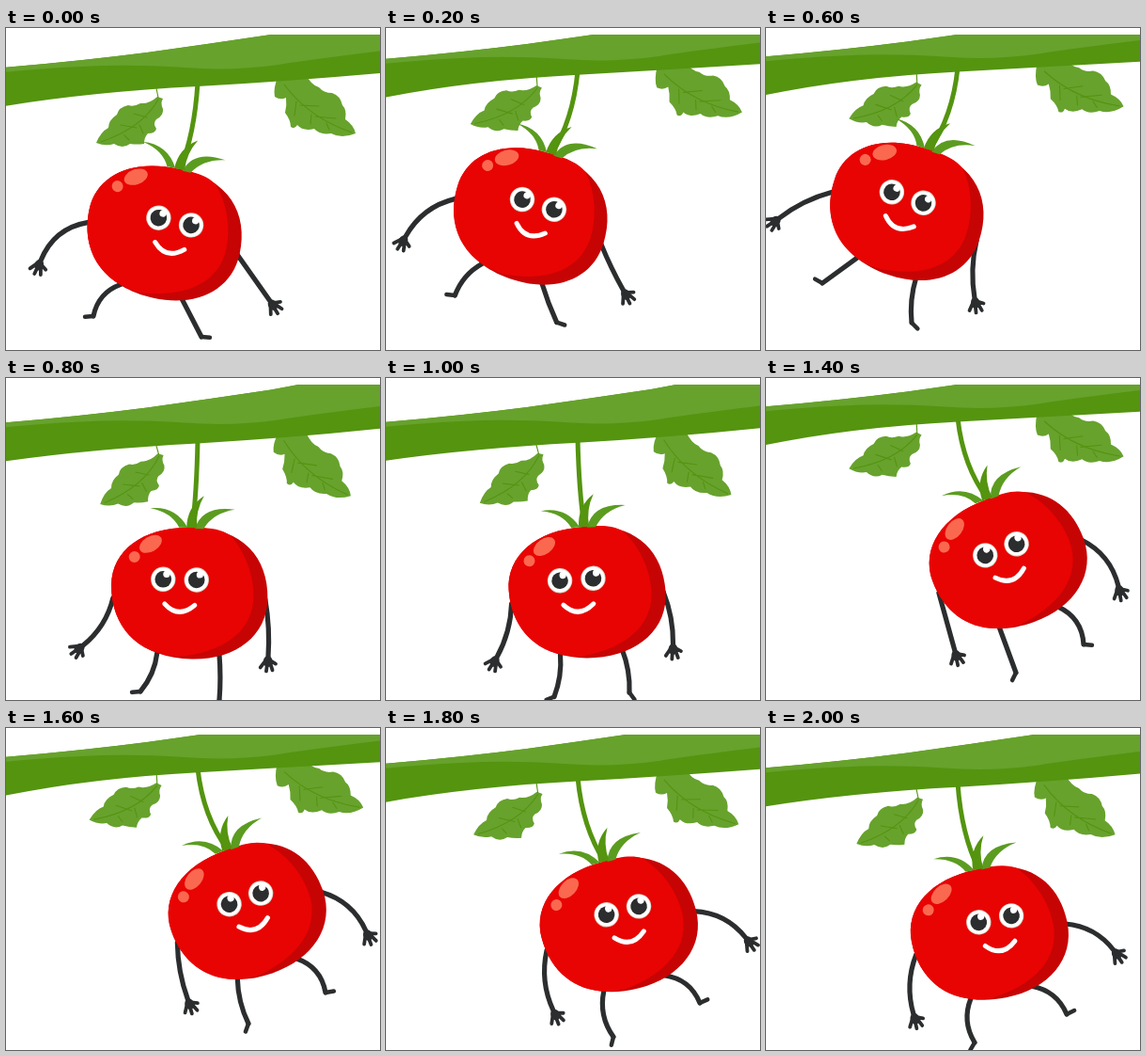
An HTML page with a canvas that plays this animation: 398 px wide and 342 px high, repeating every 2200 ms.

```html
<!DOCTYPE html>
<html lang="en">
<head>
<meta charset="utf-8">
<title>Swinging tomato</title>
<style>
  html, body { margin: 0; width: 100%; height: 100%; overflow: hidden; background: #fff; }
  canvas { display: block; }
</style>
</head>
<body>
<canvas id="stage" width="398" height="342"></canvas>
<script>
const ctx = document.getElementById('stage').getContext('2d');
const LOOP = 2200, STEP = 200;
const DARK_GREEN = '#54940f', GREEN = '#67a22d', INK = '#2b2d2e';

// Body centre and tilt in degrees, one row per step.
const SWING = [
  [168, 218, 12.5], [153, 200, 17.5], [146, 192, 20], [149, 195, 19],
  [195, 229, 1], [214, 228, -4], [235, 221, -10], [258, 195, -20],
  [257, 196, -19], [248, 210, -14.5], [238, 219, -11.3]
];

// Limb poses: end x, y (from the body centre) and bend; foot angles in degrees.
const POSES = [
  { t: 0,    face: -9,  armL: [-131, 29, .28],  armR: [113, 72, 0],    legL: [-75, 88, .28],   legR: [40, 110, 0],    footL: 175, footR: 5 },
  { t: 600,  face: -21, armL: [-135, 7, .1],    armR: [73, 92, .1],    legL: [-89, 76, 0],     legR: [6, 118, .1],    footL: 209, footR: 45 },
  { t: 800,  face: -28, armL: [-113, 55, -.17], armR: [84, 67, -.06],  legL: [-52, 104, -.15], legR: [32, 113, -.04], footL: 175, footR: 70 },
  { t: 1200, face: -28, armL: [-79, 82, -.07],  armR: [99, 43, -.14],  legL: [-18, 117, -.08], legR: [58, 99, -.17],  footL: 140, footR: 37 },
  { t: 1400, face: -21, armL: [-57, 95, 0],     armR: [117, 26, -.23], legL: [8, 118, 0],      legR: [80, 88, -.3],   footL: 116, footR: 5 },
  { t: 1800, face: -10, armL: [-70, 90, .17],   armR: [135, 13, -.23], legL: [-6, 118, .22],   legR: [86, 82, -.29],  footL: 104, footR: -24 },
  { t: 2000, face: -9,  armL: [-81, 85, .17],   armR: [132, 17, -.22], legL: [-16, 115, .25],  legR: [82, 85, -.27],  footL: 120, footR: -26 }
];

const LEAF_L = new Path2D('M161 73 Q152 81 143 80 Q136 84 130 82 Q120 84 118 92 Q109 98 109 106 Q101 110 96 122 Q106 126 115 123 Q124 129 132 123 Q139 124 147 123 Q147 116 151 112 Q159 112 160 107 Q156 101 160 97 Q168 93 167 86 Q164 80 167 75Z');
const VEINS_L = new Path2D('M160 64 L162 74 M162 76 Q145 106 101 121 M150 95 L136 91 M139 106 L122 103 M142 103 L146 112 M126 114 L131 119');
const LEAF_R = new Path2D('M290 50 Q284 64 286 73 Q292 77 298 74 Q299 82 297 90 Q303 98 303 105 Q307 108 310 103 Q316 110 328 107 Q334 114 346 112 Q357 118 372 112 Q370 103 361 97 Q363 87 358 82 Q356 72 347 69 Q338 69 333 63 Q325 61 318 48Z');
const VEINS_R = new Path2D('M296 60 Q322 95 368 111 M313 82 L333 83 M329 94 L351 96 M309 78 L307 93 M325 92 L324 102 M341 101 L344 108');
const BODY = new Path2D('M0 -70 C55 -72 83.5 -40 83.5 4 C83.5 44 50 69.5 4 69.5 C-48 69.5 -83 40 -83 -8 C-83 -45 -50 -70 0 -70Z');
const BODY_LIGHT = new Path2D('M0 -70 C20 -71 33 -69 42 -63 C59 -46 68.5 -20 68.5 2 C68.5 40 36 62 -10 67 C-54 66 -83 36 -83 -8 C-83 -45 -50 -70 0 -70Z');
const SEPALS = [
  ['M-43 -90 Q-16 -93 -3 -70 L-12 -70 Q-20 -86 -43 -90Z', '#5b9c20'],
  ['M5 -69 Q12 -94 47 -90 Q24 -86 14 -69Z', '#5b9c20'],
  ['M-4 -70 Q-4 -92 14 -104 Q5 -88 7 -70Z', DARK_GREEN]
].map(([d, color]) => [new Path2D(d), color]);

const mix = (a, b, k) => Array.isArray(a) ? a.map((v, i) => mix(v, b[i], k)) : a + (b - a) * k;
const rad = deg => deg * Math.PI / 180;

function turn(x, y, deg) {
  const c = Math.cos(rad(deg)), s = Math.sin(rad(deg));
  return [x * c - y * s, x * s + y * c];
}

function poseAt(t) {
  let i = 0;
  while (i < POSES.length - 2 && POSES[i + 1].t <= t) i++;
  const a = POSES[i], b = POSES[i + 1], k = (t - a.t) / (b.t - a.t), pose = {};
  for (const key in a) pose[key] = mix(a[key], b[key], k);
  return pose;
}

function fill(path, color) {
  ctx.fillStyle = color;
  ctx.fill(path);
}

function dot(x, y, r, color, ry = r, angle = 0) {
  ctx.beginPath();
  ctx.ellipse(x, y, r, ry, rad(angle), 0, 7);
  ctx.fillStyle = color;
  ctx.fill();
}

function stroke(color, width, path) {
  ctx.strokeStyle = color;
  ctx.lineWidth = width;
  ctx.lineCap = ctx.lineJoin = 'round';
  path ? ctx.stroke(path) : ctx.stroke();
}

function leaf(path, veins, px, py, angle, lift) {
  ctx.save();
  ctx.translate(px, py + lift);
  ctx.rotate(rad(angle));
  ctx.translate(-px, -py);
  fill(path, GREEN);
  stroke(DARK_GREEN, 1.1, veins);
  ctx.restore();
}

// The middle of the branch bends further than its ends.
function branch(lift) {
  const sag = lift * .35;
  const top = 'M-2 42 Q80 35 150 26 Q215 17 282 7 L330 -2 L420 -2';
  const whole = new Path2D(`${top} V46 Q310 ${56 + sag} 204 ${62 + sag} Q90 ${68 + sag} -2 83Z`);
  const light = new Path2D(`${top} V22 Q335 32 290 39 Q240 46 190 42 Q130 38 80 41 Q35 43 -2 47Z`);
  ctx.save();
  ctx.beginPath();
  ctx.rect(0, 7, 398, 335);
  ctx.clip();
  ctx.translate(0, lift);
  fill(whole, DARK_GREEN);
  fill(light, GREEN);
  ctx.restore();
}

function hand(x, y, angle) {
  ctx.save();
  ctx.translate(x, y);
  ctx.rotate(angle);
  dot(5, 0, 6, INK, 4.8);
  ctx.beginPath();
  for (const [fx, fy] of [[7, -8.5], [14, -5.5], [15.5, 1], [12, 7.5]]) {
    ctx.moveTo(4, fy * .3);
    ctx.lineTo(fx, fy);
  }
  stroke(INK, 3.8);
  ctx.restore();
}

function limb(joint, [ex, ey, bend], footAngle) {
  const [sx, sy] = joint, dx = ex - sx, dy = ey - sy;
  const cx = (sx + ex) / 2 - dy * bend, cy = (sy + ey) / 2 + dx * bend;
  ctx.beginPath();
  ctx.moveTo(sx, sy);
  ctx.quadraticCurveTo(cx, cy, ex, ey);
  stroke(INK, 5.2);
  if (footAngle === undefined) return hand(ex, ey, Math.atan2(ey - cy, ex - cx));
  const [fx, fy] = turn(9, 0, footAngle);
  ctx.beginPath();
  ctx.moveTo(ex, ey);
  ctx.lineTo(ex + fx, ey + fy);
  stroke(INK, 4.5);
}

function eye(x) {
  dot(x, 0, 13.2, '#d9d5c5');
  dot(x, 0, 12.3, '#fff');
  dot(x, 0, 8.8, INK);
  dot(x + 3.5, -5.5, 3.6, '#fff');
}

function tomato(x, y, tilt, pose) {
  ctx.save();
  ctx.translate(x, y);
  limb(turn(-81, 6, tilt), pose.armL);
  limb(turn(81, 5, tilt), pose.armR);
  limb(turn(-33, 63, tilt), pose.legL, pose.footL);
  limb(turn(33, 63, tilt), pose.legR, pose.footR);
  ctx.rotate(rad(tilt));
  fill(BODY, '#c70404');
  fill(BODY_LIGHT, '#e80403');
  dot(-42, -52, 13, '#fa6850', 8, -32);
  dot(-59, -38, 6, '#fa6850');
  for (const [path, color] of SEPALS) fill(path, color);
  ctx.translate(pose.face, -14.7);
  eye(0);
  eye(35.5);
  ctx.beginPath();
  ctx.moveTo(2, 26);
  ctx.quadraticCurveTo(17, 42, 34, 27);
  stroke('#fff', 5);
  ctx.restore();
}

function draw(t) {
  const [x, y, tilt] = SWING[Math.floor(t / STEP)];
  const lift = (y - 218) * .5;
  ctx.fillStyle = '#fff';
  ctx.fillRect(0, 0, 398, 342);

  leaf(LEAF_L, VEINS_L, 160, 66, -lift * .75, lift * 1.35);
  leaf(LEAF_R, VEINS_R, 292, 58, lift * .92, lift * 1.15);

  const [tx, ty] = turn(2, -70, tilt), topX = x + tx, topY = y + ty, rootY = 58 + lift * 1.35;
  ctx.beginPath();
  ctx.moveTo(204, rootY);
  ctx.quadraticCurveTo(mix(204, topX, .18), mix(rootY, topY, .6), topX, topY);
  stroke(DARK_GREEN, 5);

  branch(lift);
  tomato(x, y, tilt, poseAt(Math.floor(t / STEP) * STEP));
}

const start = performance.now();
function tick() {
  draw((performance.now() - start) % LOOP);
  requestAnimationFrame(tick);
}
tick();
</script>
</body>
</html>
```
